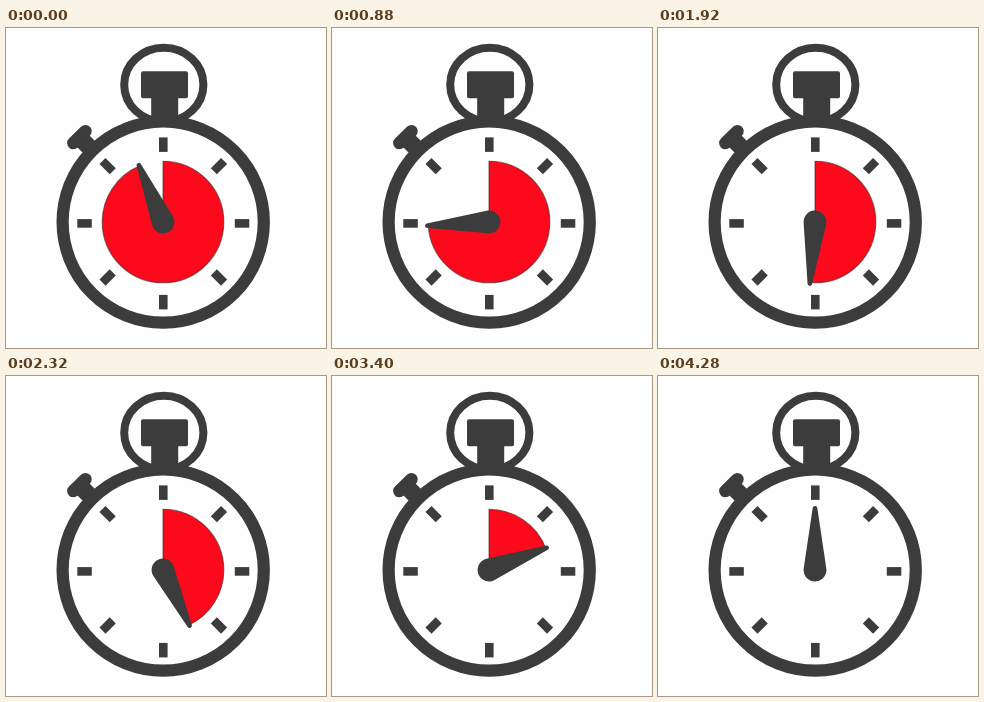
Animation of 320x320 px, one loop 4.52 s. Source, as an HTML page with a canvas:

```html
<!DOCTYPE html>
<html lang="en">
<head>
<meta charset="utf-8">
<title>Stopwatch</title>
<style>
  html, body { margin: 0; width: 100%; height: 100%; overflow: hidden; background: #fefefe; }
  canvas { display: block; width: 320px; height: 320px; }
</style>
</head>
<body>
<canvas id="stage"></canvas>
<script>
const canvas = document.getElementById('stage');
const ctx = canvas.getContext('2d');
const scale = window.devicePixelRatio || 1;
canvas.width = canvas.height = 320 * scale;

const DARK = '#3c3c3c', RED = '#fc0a1b', WHITE = '#fefefe';
const LOOP = 4520, END = 4280, STEP = 40;
const TURN = Math.PI / 180;
const PIVOT = { x: 157, y: 194 };

// Hand angle in degrees clockwise from twelve, by time
const KEYS = [[0, 337], [880, 266.5], [1560, 212], [2320, 154.5],
              [2760, 119.3], [3400, 69], [END, 0]];

function angleAt(t) {
  const i = KEYS.findIndex(k => k[0] > t);
  if (i < 0) return 0;
  const [t0, a0] = KEYS[i - 1], [t1, a1] = KEYS[i];
  return (a0 + (a1 - a0) * (t - t0) / (t1 - t0)) * TURN;
}

function ring(x, y, rx, ry, width) {
  ctx.beginPath();
  ctx.ellipse(x, y, rx, ry, 0, 0, 2 * Math.PI);
  ctx.lineWidth = width;
  ctx.fillStyle = WHITE;
  ctx.fill();
  ctx.stroke();
}

function bar(x0, y0, x1, y1, width, cap = 'butt') {
  ctx.beginPath();
  ctx.moveTo(x0, y0);
  ctx.lineTo(x1, y1);
  ctx.lineWidth = width;
  ctx.lineCap = cap;
  ctx.stroke();
}

function drawTicks() {
  for (let i = 0; i < 8; i++) {
    const a = i * Math.PI / 4, c = Math.cos(a), s = Math.sin(a);
    const cy = i % 2 ? 193.8 : 195.4;
    bar(157.3 + 71.5 * c, cy + 71.5 * s, 157.3 + 86 * c, cy + 86 * s, 8.6);
  }
}

function drawCase() {
  ctx.strokeStyle = DARK;
  ring(157.8, 56.7, 39.6, 37, 8);
  ctx.fillStyle = DARK;
  ctx.beginPath();
  ctx.roundRect(135, 43.3, 47, 27, 2);
  ctx.fill();
  ctx.fillRect(145.2, 69, 27, 28);
  bar(74, 110, 90, 126, 17);
  bar(67.4, 115, 79.4, 103.2, 12.6, 'round');
  ring(157.2, 194.1, 100.6, 100.6, 12.2);
  drawTicks();
}

function drawSector(angle) {
  if (angle <= 0) return;
  ctx.beginPath();
  ctx.moveTo(PIVOT.x, PIVOT.y);
  ctx.arc(PIVOT.x, PIVOT.y, 60.8, -Math.PI / 2, angle - Math.PI / 2);
  ctx.closePath();
  ctx.fillStyle = RED;
  ctx.fill();
  ctx.strokeStyle = 'rgba(70, 25, 28, 0.6)';
  ctx.lineWidth = 1.1;
  ctx.stroke();
}

function drawHand(angle) {
  const hub = 11.4, tip = 2.3, reach = 61.8;
  const lean = Math.asin((hub - tip) / reach);
  ctx.save();
  ctx.translate(PIVOT.x, PIVOT.y);
  ctx.rotate(angle);
  ctx.beginPath();
  ctx.arc(0, 0, hub, -lean, Math.PI + lean);
  ctx.arc(0, -reach, tip, Math.PI + lean, -lean);
  ctx.closePath();
  ctx.fillStyle = DARK;
  ctx.fill();
  ctx.restore();
}

function draw(now) {
  const t = Math.min(END, Math.floor((now % LOOP) / STEP) * STEP);
  const angle = angleAt(t);
  ctx.setTransform(scale, 0, 0, scale, 0, 0);
  ctx.fillStyle = WHITE;
  ctx.fillRect(0, 0, 320, 320);
  drawCase();
  drawSector(angle);
  drawHand(angle);
}

let start = null;
function tick(now) {
  if (start === null) start = now;
  draw(now - start);
  requestAnimationFrame(tick);
}
draw(0);
requestAnimationFrame(tick);
</script>
</body>
</html>
```
